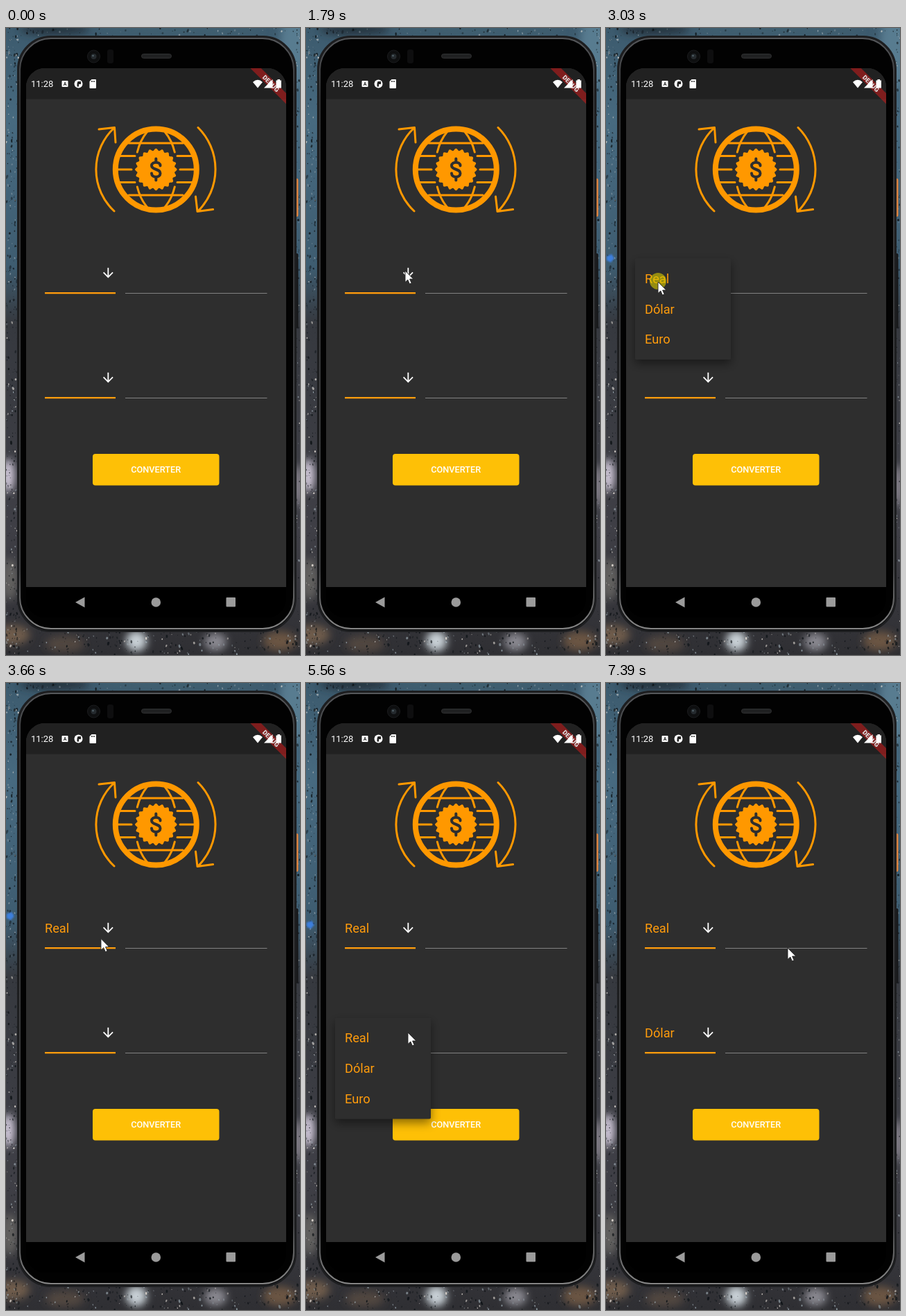
Recreate the animation shown at these times as an HTML page. Size 424 px wide and 904 px high, loop 7.46 s.

```html
<!DOCTYPE html>
<html lang="pt">
<head>
<meta charset="utf-8">
<title>Conversor</title>
<style>
html, body { margin: 0; width: 100%; height: 100%; overflow: hidden; background: #34383c; }
svg { display: block; width: 100vw; height: 100vh; }
text { font-family: Roboto, "Noto Sans", sans-serif; }
.line { fill: none; stroke-linecap: round; stroke-linejoin: round; }
.item { font-size: 18.2px; fill: #ff9c0c; }
</style>
</head>
<body>
<svg viewBox="0 0 424 904" preserveAspectRatio="none">
  <defs>
    <linearGradient id="wall" x2="0" y2="1">
      <stop offset="0" stop-color="#3c5a6d"/>
      <stop offset=".15" stop-color="#476a80"/>
      <stop offset=".38" stop-color="#3e5c70"/>
      <stop offset=".47" stop-color="#36393f"/>
      <stop offset=".8" stop-color="#3f3f46"/>
      <stop offset="1" stop-color="#2f2f33"/>
    </linearGradient>
    <linearGradient id="rim" x2="0" y2="1">
      <stop offset="0" stop-color="#55575a"/>
      <stop offset=".1" stop-color="#333436"/>
      <stop offset=".9" stop-color="#434446"/>
      <stop offset="1" stop-color="#858585"/>
    </linearGradient>
    <filter id="soft" x="-100%" y="-100%" width="300%" height="300%"><feGaussianBlur stdDeviation="6"/></filter>
    <filter id="glint" x="-100%" y="-100%" width="300%" height="300%"><feGaussianBlur stdDeviation="1"/></filter>
    <filter id="shade" x="-30%" y="-30%" width="160%" height="160%">
      <feDropShadow dx="0" dy="6" stdDeviation="7" flood-color="#000" flood-opacity=".45"/>
    </filter>
    <clipPath id="screen"><rect x="29" y="58" width="375" height="792" rx="27"/></clipPath>
  </defs>

  <rect width="424" height="904" fill="url(#wall)"/>
  <g filter="url(#soft)">
    <ellipse cx="70" cy="2" rx="50" ry="9" fill="#26343f"/>
    <ellipse cx="250" cy="2" rx="120" ry="9" fill="#405e70"/>
    <ellipse cx="415" cy="30" rx="20" ry="60" fill="#587b90"/>
    <ellipse cx="3" cy="645" rx="9" ry="24" fill="#d3cbdc"/>
    <ellipse cx="5" cy="795" rx="12" ry="30" fill="#62605f"/>
    <ellipse cx="10" cy="875" rx="24" ry="14" fill="#6e5c4c"/>
    <ellipse cx="85" cy="888" rx="28" ry="12" fill="#51463f"/>
    <ellipse cx="188" cy="884" rx="15" ry="15" fill="#c8d0d6"/>
    <ellipse cx="302" cy="885" rx="16" ry="13" fill="#88878f"/>
    <ellipse cx="395" cy="884" rx="24" ry="14" fill="#6b5442"/>
    <ellipse cx="422" cy="660" rx="8" ry="30" fill="#86828c"/>
  </g>
  <g id="drops"></g>
  <path id="blue" d="M1 -3L8 -6L12 0L7 6L1 3Z" fill="#3e7fdc" filter="url(#glint)"/>

  <rect x="416" y="217" width="5.500" height="55" rx="2" fill="#d9813f"/>
  <rect x="416" y="325" width="5.500" height="108" rx="2" fill="#17181a"/>
  <rect x="17.500" y="12.500" width="400" height="857" rx="47" fill="#0c0c0d" stroke="#1d1e20" stroke-width="3"/>
  <rect x="20" y="15" width="395" height="851" rx="45" fill="#020202" stroke="url(#rim)" stroke-width="2"/>
  <circle cx="126.500" cy="41" r="9" fill="#0e0f10" stroke="#1c1d1f"/>
  <circle cx="126.500" cy="41" r="4" fill="#252a2e"/>
  <circle cx="125.500" cy="40" r="1.300" fill="#53616a"/>
  <rect x="146" y="31" width="9" height="20" rx="3" fill="#0e0e0f"/>
  <rect x="195.500" y="37.500" width="43" height="6" rx="3" fill="#202122" stroke="#303132"/>

  <g clip-path="url(#screen)">
    <rect x="29" y="58" width="375" height="748" fill="#2e2e2e"/>
    <rect x="29" y="58" width="375" height="44.500" fill="#212121"/>
    <rect x="29" y="806" width="375" height="44" fill="#000"/>
    <path d="M352.400 58H367.900L404 94.100V109.600Z" fill="#b71c1c" fill-opacity=".627"/>
    <text transform="translate(382 80) rotate(45)" y="3.300" text-anchor="middle" font-size="9.300" font-weight="900" fill="#ddd">DEBUG</text>
  </g>

  <g fill="#fff">
    <text x="36" y="85" font-size="13">11:28</text>
    <rect x="80.500" y="76" width="9" height="9" rx="1"/>
    <text x="85" y="83" font-size="7" font-weight="700" text-anchor="middle" style="fill:#212121">A</text>
    <circle cx="104.500" cy="80.500" r="6"/>
    <path d="M103.500 77H108V81H105V84.500H102.500V80Z" fill="#212121"/>
    <path d="M123.500 74H129Q130 74 130 75V86Q130 87 129 87H121.500Q120.500 87 120.500 86V77Z"/>
    <path d="M123.500 76V78M125.500 76V78M127.500 76V78" stroke="#212121"/>
    <path d="M356 78Q363 71.500 370 78L363 86.500Z"/>
    <path d="M372 86.500L384.500 74V86.500Z"/>
    <path d="M389.500 75.500H391.500V74H395V75.500H397V86.500H389.500Z"/>
  </g>
  <g fill="#9b9b9b">
    <path d="M100 828L113.500 820.500V835.500Z"/>
    <circle cx="216.300" cy="828" r="6.800"/>
    <rect x="317.500" y="821" width="13.500" height="13.500" rx="1"/>
  </g>

  <g class="line" stroke="#ff9800" stroke-width="3">
    <path d="M156 264A82 82 0 0 1 156 144M134 146L156.500 143.500L158 165"/>
    <path d="M277 143.500A85 85 0 0 1 277 264M298.500 261.500L276 264.500L273.500 243"/>
    <path d="M177 166H255M163 184.500H186M247 184.500H269M160 204H181M251 204H273M163 222.500H186M247 222.500H269M177 241H255"/>
    <g id="meridians"></g>
    <circle cx="216.300" cy="204" r="58.500" stroke-width="8"/>
    <path id="seal" fill="#ff9800" stroke="none"/>
    <path d="M222.500 198.500C222.500 192 210 192 210 198.500C210 205 222.500 202.500 222.500 209.500C222.500 216.500 210 216.500 210 209.500M216.300 188.500V193M216.300 215V219.500" stroke="#2e2e2e" stroke-width="4"/>
  </g>

  <g id="fields"></g>
  <rect x="125" y="614" width="182.500" height="45.600" rx="4" fill="#fec006"/>
  <text x="216.200" y="641.400" text-anchor="middle" font-size="12.700" font-weight="500" fill="#fff">CONVERTER</text>
  <g id="menus"></g>

  <circle id="press" r="12" fill="#d5c800"/>
  <path id="cursor" d="M0 0V16.500L3.800 13L6.400 19L9.200 17.800L6.600 12H11.800Z" fill="#fff" stroke="#222" stroke-width=".9"/>
</svg>

<script>
const LOOP = 7460, ROW = 150.5, STEP = 43.8;
const NAMES = ['Real', 'Dólar', 'Euro'];
const $ = id => document.getElementById(id);
const clamp = v => Math.max(0, Math.min(1, v));
const ramp = (t, from, to) => clamp((t - from) / (to - from));
const smooth = v => v * v * (3 - 2 * v);
const set = (el, attrs) => { for (const k in attrs) el.setAttribute(k, attrs[k]); };

// Rain specks on the window, only along the visible margins
let seed = 11;
const rnd = () => (seed = seed * 16807 % 2147483647) / 2147483647;
let specks = '';
for (let i = 0; i < 850; i++) {
  const side = rnd(), a = rnd(), b = rnd();
  const [x, y] = side < .45 ? [a * 19, b * 904]
    : side < .77 ? [a * 424, 864 + b * 40]
    : side < .85 ? [a * 424, b * 13]
    : [416 + a * 8, b * 904];
  const size = .4 + rnd() * rnd() * 1.4;
  const tone = rnd() < .65 ? '#0e1317' : rnd() < .65 ? '#9aa7af' : '#e2dcd4';
  specks += `<ellipse cx="${x}" cy="${y}" rx="${size}" ry="${size * (1 + rnd())}" transform="rotate(${rnd() * 50 - 25} ${x} ${y})" fill="${tone}" opacity="${.4 + rnd() * .5}"/>`;
}
$('drops').innerHTML = specks;

// One globe curve mirrored into the four quarters
$('meridians').innerHTML = [[1, 1], [-1, 1], [1, -1], [-1, -1]].map(([x, y]) =>
  `<path transform="translate(216.3 204) scale(${x} ${y})" d="M-13 -54Q-23 -42 -27 -25"/>`).join('');

// Scalloped seal behind the dollar sign
let outline = '';
for (let i = 0; i <= 180; i++) {
  const a = i * Math.PI / 90, r = 28.7 + 1.6 * Math.cos(20 * a);
  outline += `${i ? 'L' : 'M'}${216.3 + r * Math.cos(a)} ${204 + r * Math.sin(a)}`;
}
set($('seal'), { d: outline });

$('fields').innerHTML = [0, 1].map(i => `<g transform="translate(0 ${Math.round(i * ROW)})">
  <text class="item" x="56" y="360">${NAMES[i]}</text>
  <path transform="translate(136.300 342) scale(.92)" d="M20 12L18.600 10.600L13 16.200V4H11V16.200L5.400 10.600L4 12L12 20Z" fill="#fff"/>
  <rect x="56" y="381" width="102" height="2.300" fill="#ff9c0c"/>
  <rect x="172" y="382" width="204.500" height="1" fill="#828282"/></g>`).join('');

$('menus').innerHTML = [0, 1].map(i => `<g transform="translate(0 ${i * ROW})">
  <rect class="box" x="42" y="332" width="138" height="146" rx="2" fill="#2e2e2e" filter="url(#shade)"/>
  <rect class="glow" x="42" y="${339 + STEP * i}" width="138" height="${STEP}" fill="#50504d"/>
  <circle class="ripple" cx="${i ? 112 : 75}" cy="${i ? 403.5 : 365}" fill="#737371"/>
  ${NAMES.map((n, k) => `<text class="item" x="56" y="${367.8 + STEP * k}">${n}</text>`).join('')}</g>`).join('');

const values = [...document.querySelectorAll('#fields text')];
const menus = [...document.querySelectorAll('#menus > g')].map((g, i) => ({
  g, box: g.querySelector('.box'), glow: g.querySelector('.glow'),
  ripple: g.querySelector('.ripple'), items: [...g.querySelectorAll('text')],
  open: [2080, 5220][i], pick: [3080, 6220][i], close: [3380, 6540][i]
}));

// time, x, y
const path = [
  [1000, 430, 420], [1650, 143, 350], [2250, 143, 350], [2850, 75, 366],
  [3250, 75, 366], [4050, 194, 371], [4450, 194, 371], [5000, 147, 504],
  [5600, 147, 504], [6130, 113, 554], [6600, 113, 554], [7300, 262, 382]
];
const presses = [1900, 2960, 5060, 6100];

function cursorAt(t) {
  let i = 0;
  while (i < path.length - 2 && t > path[i + 1][0]) i++;
  const [a, b] = [path[i], path[i + 1]], p = smooth(ramp(t, a[0], b[0]));
  return [a[1] + (b[1] - a[1]) * p, a[2] + (b[2] - a[2]) * p];
}

function drawMenu(m, t, i) {
  const grow = smooth(ramp(t, m.open, m.open + 300));
  const shown = ramp(t, m.open, m.open + 80) * (1 - ramp(t, m.close, m.close + 200));
  set(m.g, { opacity: shown });
  set(m.box, { height: 44 + 102 * grow });
  m.items.forEach((item, k) => set(item, { opacity: ramp(grow, .2 + k * .2, .5 + k * .2) }));
  set(m.glow, { opacity: ramp(t, m.pick, m.pick + 80) });
  const spread = ramp(t, m.pick, m.close);
  set(m.ripple, { r: 5 + 23 * spread, opacity: spread ? .8 * (1 - ramp(t, m.pick + 150, m.close)) : 0 });
  set(values[i], { opacity: t >= m.close ? 1 : 0 });
}

function frame(now) {
  const t = now % LOOP, [x, y] = cursorAt(t);
  set($('cursor'), { transform: `translate(${x} ${y})`, opacity: t < 1000 ? 0 : 1 });
  const held = presses.some(p => t >= p && t < p + 140);
  set($('press'), { cx: x, cy: y - 1, opacity: held ? .62 : 0 });
  menus.forEach((m, i) => drawMenu(m, t, i));
  set($('blue'), {
    transform: `translate(0 ${332 + (t - 3030) * .0065})`,
    opacity: ramp(t, 2300, 2800) * (1 - ramp(t, 6700, 7100))
  });
  requestAnimationFrame(frame);
}
requestAnimationFrame(frame);
</script>
</body>
</html>
```
